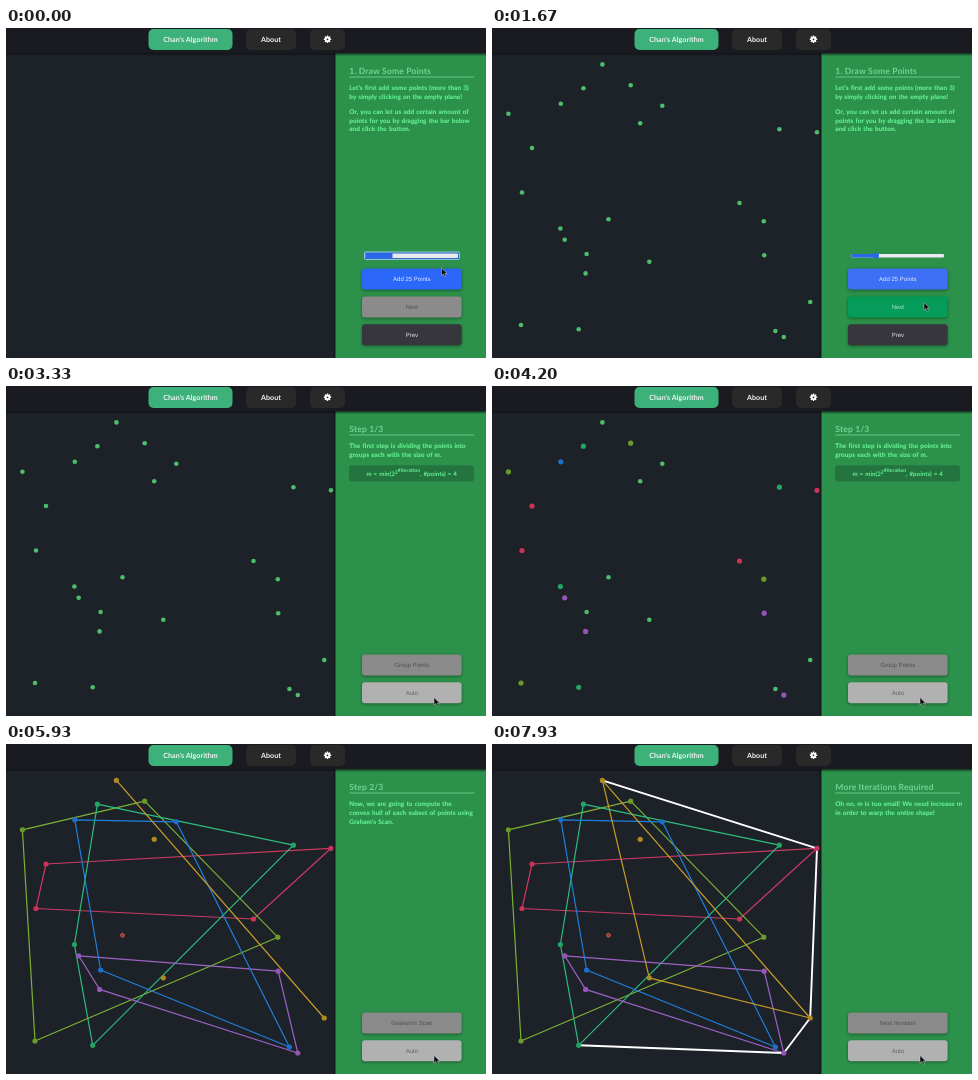
Write an HTML page that moves like this. It is 480 by 330 pixels and loops after 8 s.

```html
<!DOCTYPE html>
<html lang="en">
<head>
<meta charset="utf-8">
<title>Chan's Algorithm</title>
<style>
  html, body { margin: 0; width: 100%; height: 100%; overflow: hidden; background: #1d2128; }
  svg { display: block; width: 100vw; height: 100vh; }
  text { font-family: Lato, sans-serif; font-weight: 700; text-rendering: geometricPrecision; }
  .tab { font-size: 7.1px; letter-spacing: .06px; fill: #f4f6f5; text-anchor: middle; }
  .title { font-size: 8.6px; letter-spacing: .12px; fill: #6fd592; }
  .body { font-size: 6.4px; letter-spacing: .06px; word-spacing: .5px; fill: #66f295; stroke: #66f295; stroke-width: .12px; }
  .formula { font-size: 6.2px; word-spacing: .5px; fill: #66f295; text-anchor: middle; }
  .sup { font-size: 5.1px; }
  .label { font: 400 6px "Liberation Sans", Arial, sans-serif; text-anchor: middle; }
  .raised { filter: drop-shadow(0 1px 1.5px rgba(0, 0, 0, .38)); }
</style>
</head>
<body>
<svg id="stage" viewBox="0 0 480 330" preserveAspectRatio="none">
  <defs>
    <linearGradient id="down" x2="0" y2="1">
      <stop stop-color="#0b0d10" stop-opacity=".75"/><stop offset="1" stop-color="#0b0d10" stop-opacity="0"/>
    </linearGradient>
    <linearGradient id="left">
      <stop stop-color="#0b0d10" stop-opacity="0"/><stop offset="1" stop-color="#0b0d10" stop-opacity=".6"/>
    </linearGradient>
  </defs>
  <rect width="480" height="330" fill="#1d2128"/>
  <g id="plane"></g>
  <rect x="326.5" y="25" width="3" height="305" fill="url(#left)"/>
  <rect x="329.5" y="25" width="150.5" height="305" fill="#2c914a"/>
  <g id="panel"></g>
  <rect y="25" width="480" height="3" fill="url(#down)"/>
  <rect width="480" height="25" fill="#191b20"/>
  <g id="tabs"></g>
  <path id="cursor" d="M0 0V7.6L1.8 6L3 8.8L4.4 8.2L3.2 5.5H5.6Z" fill="#080808" stroke="#c9d2d6" stroke-width=".5"/>
</svg>
<script>
const LOOP = 8000;
const ADD_AT = 270, ADD_STEP = 40;
const COLOR_AT = 3470, COLOR_STEP = 44;
const HULL_AT = 5070, HULL_STEP = 42;
const MARCH_AT = 6600, MARCH_STEP = 40;
const ADDED = ADD_AT + ADD_STEP * 25;

const byId = id => document.getElementById(id);
function el(parent, tag, attrs = {}, text) {
  const node = document.createElementNS("http://www.w3.org/2000/svg", tag);
  set(node, attrs);
  if (text !== undefined) node.textContent = text;
  return parent.appendChild(node);
}
function set(node, attrs) {
  for (const key in attrs) node.setAttribute(key, attrs[key]);
}
const show = (node, on) => { node.style.display = on ? "" : "none"; };

// Each group: line colour, dot colour, points
const groups = [
  ["#c93a62", "#cb3459", [[40, 120], [30, 164.5], [247.5, 175], [325, 104.3]]],
  ["#7bb236", "#6b9a2a", [[138.7, 57.2], [271.8, 193.2], [16.4, 85.8], [29, 297]]],
  ["#2cbd7d", "#23a465", [[91.4, 60.2], [68.4, 200.5], [86.7, 301.3], [287.4, 101.2]]],
  ["#9c62c4", "#9655b8", [[72.7, 211.8], [93.6, 245.4], [272.2, 227.2], [291.8, 309]]],
  ["#1f80dd", "#1d6fcd", [[68.8, 75.8], [94.6, 226], [283.4, 303], [170.3, 77.8]]],
  ["#c59d29", "#b08922", [[110.4, 36.4], [318.2, 274], [148.2, 95.3], [157.3, 233.8]]],
  ["#d2553f", "#d2553f", [[116.5, 191.3]]]
].map(([line, dot, pts]) => ({ line, dot, pts }));

const cross = (a, b, c) => (b[0] - a[0]) * (c[1] - a[1]) - (b[1] - a[1]) * (c[0] - a[0]);
const toPath = pts => "M" + pts.map(p => p.join(" ")).join("L");

// Graham's scan, keeping the outline after every step
function scan(pts) {
  const top = pts.reduce((a, b) => (b[1] < a[1] ? b : a));
  const angle = p => Math.atan2(p[1] - top[1], p[0] - top[0]);
  const rest = pts.filter(p => p !== top).sort((a, b) => angle(a) - angle(b));
  const hull = [top], states = [];
  for (const p of rest) {
    while (hull.length > 1 && cross(hull.at(-2), hull.at(-1), p) <= 0) hull.pop();
    hull.push(p);
    states.push(toPath(hull));
  }
  if (rest.length) states.push(toPath(hull) + "Z");
  return states;
}

// Jarvis's march: one tangent candidate per group for each edge
function march(start, edges) {
  const steps = [], done = [start];
  for (let i = 0; i < edges; i++) {
    const from = done.at(-1);
    const outer = (a, b) => (cross(from, a, b) < 0 ? b : a);
    let best = null;
    for (const g of groups) {
      const next = g.pts.filter(p => p !== from).reduce(outer);
      best = best ? outer(best, next) : next;
      steps.push({ solid: toPath([...done, best]), trial: toPath([from, next]) });
    }
    done.push(best);
  }
  return steps;
}

// Plane
const plane = byId("plane");
let hullCount = 0;
for (const g of groups) {
  g.states = scan(g.pts);
  g.first = hullCount;
  hullCount += g.states.length;
  g.node = el(plane, "path", { fill: "none", stroke: g.line, "stroke-width": 1.2, "stroke-linejoin": "round" });
}
const marchSteps = march(groups[5].pts[0], 4);
const solid = el(plane, "path", { fill: "none", stroke: "#fff", "stroke-width": 1.9, "stroke-linejoin": "round" });
const trial = el(plane, "path", { fill: "none", stroke: "#f4f4f4", "stroke-width": 1.1 });
const dots = groups.flatMap(g => g.pts.map(([cx, cy]) => ({
  color: g.dot, single: g.pts.length === 1, node: el(plane, "circle", { cx, cy })
})));

// Header
const tabs = byId("tabs");
function tab(x, w, fill, text) {
  el(tabs, "rect", { x, y: 1, width: w, height: 21, rx: 5, fill });
  if (text) el(tabs, "text", { x: x + w / 2, y: 14, class: "tab" }, text);
}
tab(142.5, 84, "#3cb179", "Chan's Algorithm");
tab(240, 50, "#29292a", "About");
tab(304, 35, "#29292a");
const gear = el(tabs, "g", { transform: "translate(321.5 11.3)" });
for (let a = 0; a < 360; a += 45)
  el(gear, "rect", { x: -.7, y: -3.7, width: 1.4, height: 2, rx: .2, fill: "#fff", transform: `rotate(${a})` });
el(gear, "circle", { r: 1.8, fill: "none", stroke: "#fff", "stroke-width": 1.8 });

// Side panel
const panel = byId("panel");
const pages = [
  { at: 0, title: "1. Draw Some Points", lines: [
    [62, "Let's first add some points (more than 3)"], [71, "by simply clicking on the empty plane!"],
    [85.5, "Or, you can let us add certain amount of"], [94.5, "points for you by dragging the bar below"],
    [103, "and click the button."]] },
  { at: 2030, title: "Step 1/3", action: "Group Points", lines: [
    [62, "The first step is dividing the points into"], [71, "groups each with the size of m."]] },
  { at: 4570, title: "Step 2/3", action: "Graham's Scan", lines: [
    [62, "Now, we are going to compute the"], [71, "convex hull of each subset of points using"],
    [79.5, "Graham's Scan."]] },
  { at: 6230, title: "Step 3/3", action: "Jarvis's March", lines: [
    [62, "Starting from the up-most vertex in the"], [71, "plane, m number of convex edges will be"],
    [79.5, "computed using Jarvis's March."]] },
  { at: 7890, title: "More Iterations Required", action: "Next Iteration", lines: [
    [62, "Oh no, m is too small! We need increase m"], [71, "in order to warp the entire shape!"]] }
];
for (const page of pages) {
  page.node = el(panel, "g");
  el(page.node, "text", { x: 343.3, y: 46, class: "title" }, page.title);
  for (const [y, line] of page.lines) el(page.node, "text", { x: 343.3, y, class: "body" }, line);
}
el(panel, "rect", { x: 343.3, y: 48.6, width: 125, height: .8, fill: "#70d793" });

const stepOne = pages[1].node;
el(stepOne, "rect", { x: 343, y: 79.3, width: 125, height: 16.2, rx: 3, fill: "#23743f" });
const formula = el(stepOne, "text", { x: 405.7, y: 89.7, class: "formula" });
el(formula, "tspan", {}, "m = min(2");
el(formula, "tspan", { class: "sup", dy: -2.1 }, "2");
el(formula, "tspan", { class: "sup", dy: -2 }, "#iteration");
el(formula, "tspan", { dy: 4.1 }, ", #points) = 4");

// Slider
const slider = el(pages[0].node, "g");
const focus = el(slider, "rect", { x: 358.6, y: 224, width: 94.8, height: 7.4, rx: 1, fill: "#2366b4", stroke: "#a9d3f5", "stroke-width": .9 });
const track = el(slider, "rect", { x: 359.5, width: 92.5, rx: 1, fill: "#e9e9ef" });
const filled = el(slider, "rect", { x: 359.5, width: 25, rx: 1, fill: "#2c67ea" });
const thumb = el(slider, "circle", { cx: 384, cy: 227.8, r: 3, fill: "#2c67ea" });

function button(y) {
  const g = el(panel, "g");
  const box = el(g, "rect", { x: 356, y, width: 99.6, height: 21, rx: 3, class: "raised" });
  const label = el(g, "text", { x: 405.8, y: y + 12.7, class: "label" });
  return (text, fill, color) => {
    show(g, text);
    set(box, { fill });
    set(label, { fill: color });
    if (label.textContent !== text) label.textContent = text;
  };
}
const upper = button(240.6), middle = button(268.5), lower = button(296.2);

// Cursor: time, x, y
const route = [[0, 435.5, 240], [800, 435.5, 240], [1450, 432, 274.5], [1700, 432, 274.5],
  [1930, 431.2, 279], [2870, 431.2, 279], [3270, 428, 311.5], [LOOP, 428, 311.5]];
function cursorAt(t) {
  const i = route.findIndex(stop => stop[0] > t);
  const [t0, x0, y0] = route[i - 1], [t1, x1, y1] = route[i];
  const k = (t - t0) / (t1 - t0), e = k * k * (3 - 2 * k);
  return [x0 + (x1 - x0) * e, y0 + (y1 - y0) * e];
}

function drawPlane(t) {
  dots.forEach((dot, i) => {
    const grow = Math.min(1, Math.max(0, (t - ADD_AT - i * ADD_STEP) / 120));
    const colored = t >= COLOR_AT + i * COLOR_STEP;
    const ring = colored && dot.single;
    set(dot.node, {
      r: ring ? 1.9 : (colored ? 2.6 : 2.3) * grow,
      fill: ring ? "#8a3a36" : colored ? dot.color : "#4dbd6c",
      stroke: ring ? dot.color : "none"
    });
  });
  const step = Math.floor((t - HULL_AT) / HULL_STEP);
  for (const g of groups) {
    const i = Math.min(step - g.first, g.states.length - 1);
    set(g.node, { d: g.states[i] || "" });
  }
  const k = Math.floor((t - MARCH_AT) / MARCH_STEP);
  const last = marchSteps.length - 1;
  const now = marchSteps[Math.min(k, last)];
  set(solid, { d: now ? now.solid : "" });
  set(trial, { d: now && k <= last ? now.trial : "" });
}

function drawPanel(t, y) {
  const page = pages.findLast(p => t >= p.at);
  for (const p of pages) show(p.node, p === page);

  const focused = t < 100;
  show(focus, focused);
  set(track, { y: focused ? 225.4 : 226.1, height: focused ? 4.6 : 3.4 });
  set(filled, { y: focused ? 225 : 226.1, height: focused ? 5.4 : 3.4, width: focused ? 27 : 25 });
  show(thumb, !focused);

  if (page === pages[0]) {
    const over = y > 268;
    upper("Add 25 Points", focused ? "#2b68fa" : "#3e70f5", "#e3eaff");
    if (t < ADDED) middle("Next", "#8b8b8b", "#515151");
    else middle("Next", over ? "#059c59" : "#0d9654", "#b5e6cb");
    lower("Prev", "#37363d", "#e6e6e8");
    return;
  }
  upper("", "none", "none");
  const auto = t >= 3330, over = y > 296;
  middle(page.action, auto ? "#8a8a8a" : y > 289.5 ? "#0d9654" : "#059c59", auto ? "#505050" : "#dcf3e6");
  lower("Auto", auto ? "#b1b1b1" : over ? "#3e70f5" : "#2d58d4", auto ? "#626262" : "#e3eaff");
}

function render(t) {
  const [x, y] = cursorAt(t);
  drawPlane(t);
  drawPanel(t, y);
  set(byId("cursor"), { transform: `translate(${x} ${y})` });
}

const begin = performance.now();
function tick() {
  render((performance.now() - begin) % LOOP);
  requestAnimationFrame(tick);
}
tick();
</script>
</body>
</html>
```
